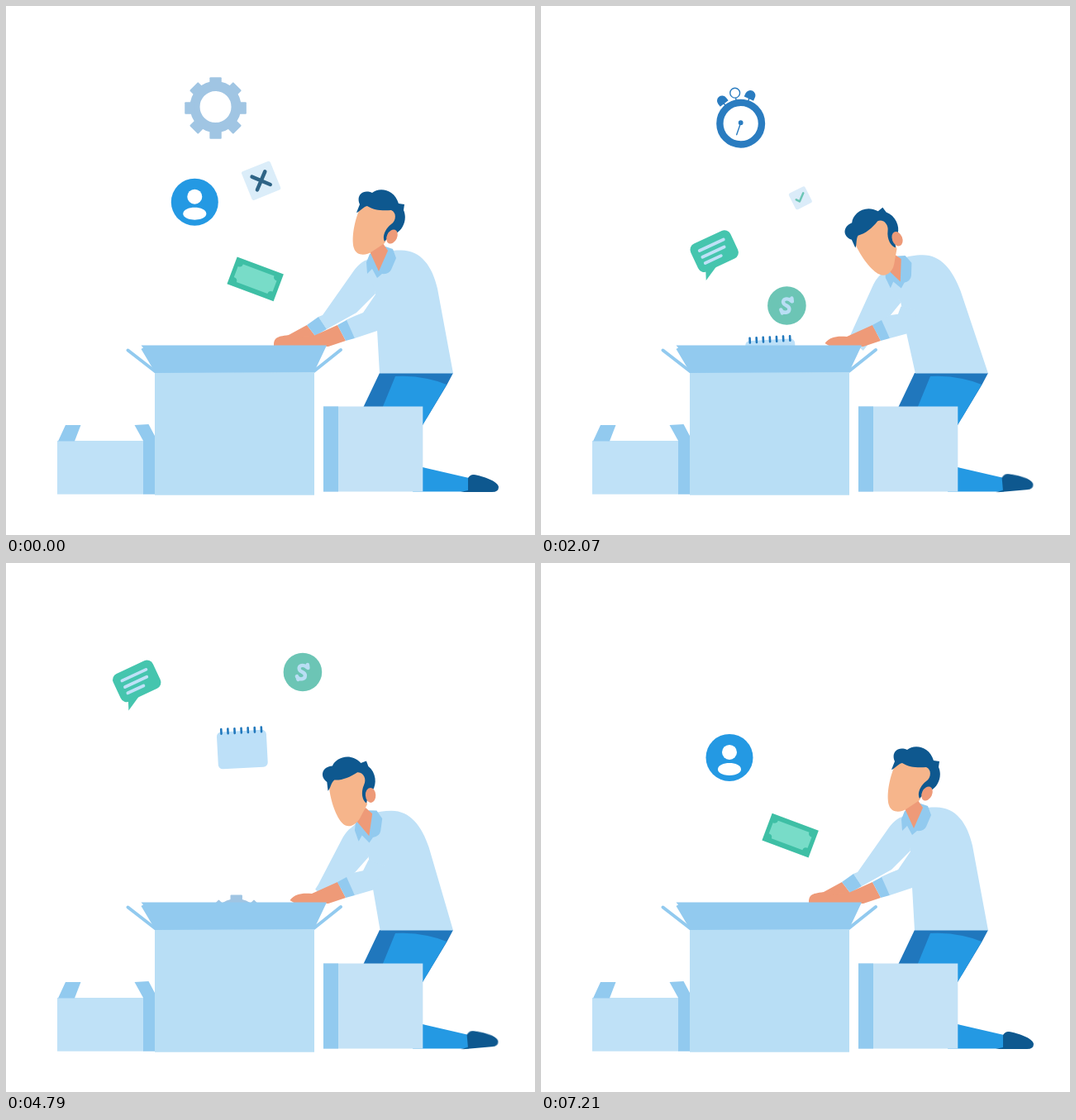
Recreate the animation shown at these times as an HTML page. Size 640 px wide and 640 px high, loop 7280 ms.

```html
<!DOCTYPE html>
<html lang="en">
<head>
<meta charset="utf-8">
<title>Packing a box</title>
<style>
  html, body { margin: 0; width: 100%; height: 100%; overflow: hidden; background: #fff; }
  svg { display: block; width: 100vw; height: 100vh; }
  .line { fill: none; stroke-linecap: round; stroke-linejoin: round; }
  .shirt { fill: #bfe1f7; }
  .trim { fill: #92caef; }
  .skin { fill: #ee9a78; }
  .navy { fill: #0e588f; }
  .blue { fill: #2499e3; }
  .bell { fill: #2a7cc0; }
  #shoe { transform-origin: 556px 587px; animation: tap 7280ms linear infinite; }
  @keyframes tap {
    0%, 24%, 39%, 59%, 72%, 100% { transform: none; }
    28%, 33%, 63%, 67% { transform: rotate(-5deg); }
  }
</style>
</head>
<body>
<svg viewBox="0 0 640 640">
  <!-- things that drop into the box -->
  <g id="gear" fill="#a0c5e3">
    <circle cy="-1.5" r="25" fill="none" stroke="#a0c5e3" stroke-width="12"/>
  </g>
  <g id="user">
    <circle class="blue" r="28.5"/>
    <circle cy="-6.5" r="9" fill="#fff"/>
    <path d="M-14,14C-14,4 14,4 14,14C14,24 -14,24 -14,14Z" fill="#fff"/>
  </g>
  <g id="bill">
    <g transform="rotate(20.5)">
      <path d="M-30,-17.5H30V17.5H-30Z" fill="#3ebfa5"/>
      <path d="M-20,-11.5H20Q20,-7 25,-7V7Q20,7 20,11.5H-20Q-20,7 -25,7V-7Q-20,-7 -20,-11.5Z" fill="#78dcc8"/>
    </g>
  </g>
  <g id="cross">
    <g transform="rotate(-22)">
      <rect x="-18.7" y="-18.7" width="37.4" height="37.4" rx="2.5" fill="#dbedf9"/>
      <path class="line" d="M-8.5,-8.5L8.5,8.5M8.5,-8.5L-8.5,8.5" stroke="#2f6486" stroke-width="4.5"/>
    </g>
  </g>
  <g id="clock" stroke="#2a7cc0" stroke-width="1.4">
    <path class="line" d="M-6,-31L-5.5,-27M-21,-25L-17,-20M10.500,-32L9,-27"/>
    <circle cx="-7" cy="-37" r="5.900" fill="#fff"/>
    <path class="bell" d="M-5.500,3.500V0A5.500,5.500 0 0 1 5.500,0V3.500Z" transform="translate(-22.500 -27.500) rotate(-38)"/>
    <path class="bell" d="M-5.500,3.500V0A5.500,5.500 0 0 1 5.500,0V3.500Z" transform="translate(11.500 -34) rotate(25)"/>
    <circle r="25.300" fill="#fff" stroke-width="8.400"/>
    <path class="line" d="M0,-1L-5,13.500"/>
    <circle class="bell" cy="-1" r="2.200"/>
  </g>
  <g id="check">
    <g transform="rotate(-27)">
      <rect x="-11" y="-11" width="22" height="22" rx="2.500" fill="#dbecf9"/>
      <path class="line" d="M-5.400,-.5L-2.700,3.200L5.800,-3.800" stroke="#6cc5b5" stroke-width="2.500"/>
    </g>
  </g>
  <g id="chat">
    <g transform="rotate(-25)">
      <rect x="-26.500" y="-18.500" width="53" height="37" rx="8" fill="#45c5ae"/>
      <path d="M-19,16L-24,28L-4,17Z" fill="#45c5ae"/>
      <path class="line" d="M-16,-8H16M-16,.5H13M-16,8.500H5" stroke="#bfe1f7" stroke-width="3.800"/>
    </g>
  </g>
  <g id="coin">
    <circle r="23.300" fill="#6cc5b5"/>
    <path class="line" d="M5.500,-5.500C1,-10 -6,-8 -4,-3C-3,0 3,0 3,4C3,9 -4,10 -7,5.500M6,-9L6.500,-5M-7,5L-5.500,9" stroke="#b9def4" stroke-width="4.400"/>
  </g>
  <g id="pad">
    <g transform="rotate(-3)">
      <rect x="-30" y="-21.500" width="60" height="45" rx="5.500" fill="#bde0f8"/>
      <path class="line" id="rings" stroke="#2279bd" stroke-width="2.600"/>
    </g>
  </g>

  <!-- legs -->
  <path d="M452,444H541L533,459L504,507L432,486Z" fill="#2077bd"/>
  <path class="blue" d="M471,448Q502,446 533,458L504,507L500,520L455,487Z"/>
  <path class="blue" d="M504,558L560,571V587.500H492Z"/>
  <path class="navy" id="shoe" d="M559,571Q562,566.500 566,567C576,568.500 596,575 596,582Q596,588 588,588H550L559,586Z"/>

  <!-- upper body: data-bent holds the outline when leaning in -->
  <path class="shirt" d="M441,306C430,308 425,315 421,320L383,374L378,376L388,391L424,371L447,348Z"
    data-bent="M412,324C406,328 403,333 400,339L375,397L372,405L390,420L423,374L434,360Z"/>
  <g id="farHand">
    <path class="skin" d="M364,386L342,398C326,400 324,402 324,412H360L374,399Z"/>
    <path class="trim" d="M364,386L378,376L388,391L374,399Z"/>
  </g>
  <path class="shirt" d="M436,308C448,297 464,295.5 478,295.5C502,295.5 516,315 522,342L541,444.5L452,444.5L449,392L447,348Z"
    data-bent="M409,326C425,308 440,302 460,302C482,302 496,320 506,345L541,444.5L453,444.5L441.5,397L434,360Z"/>
  <path class="skin" d="M401,386L370,400C358,399 350,400 343.500,408L350,412H390L411,405Z"/>
  <path class="shirt" d="M411,380L422,375L432,371L447,349L462,360L449,393L422,402Z"
    data-bent="M411,380L423,374L432,373L434,365L455,370L441.5,397L422,402Z"/>
  <path class="trim" d="M401,386L412,380L422,402L411,405Z"/>
  <g id="neck">
    <path class="trim" d="M440,300L436,310L437,324L443,318L449,329L455,324Q463,325 466,319L472,305L468,294L459,291Z"/>
    <path class="skin" d="M440,297L456,287L462,296L451,321Z"/>
  </g>
  <g id="head">
    <path d="M428,245C420,264 418,284 421,293C424,303 436,302 443,297L458,287L462,278L472,262L470,246L440,240Z" fill="#f6b58b"/>
    <path class="navy" d="M424,250L428,240C423,229 432,221 443,226C451,219 470,221 475,239L482,240L481,247C486,258 480,271 472,275C465,276 460,283 458,285C455,280 458,270 466,264C472,260 473,250 466,247C455,248 445,247 437,242C432,243 428,249 424,250Z"/>
    <ellipse class="skin" rx="6.200" ry="9" transform="translate(467 279) rotate(25)"/>
  </g>

  <!-- boxes -->
  <rect class="shirt" x="62" y="526" width="104.500" height="64.700"/>
  <path class="trim" d="M72,507H90.500L83,526.500H63ZM155.500,507L172.500,506L180.500,521V590.700H166V526Z"/>
  <path class="line" d="M147.500,416.500L181,442.500M405,416L373,441.500" stroke="#92caef" stroke-width="4"/>
  <path class="trim" d="M163.500,410.500H388L375,438L373,444H180L179,441L163.500,415L166,413.500Z"/>
  <path d="M180,444L373,443V591.700H180Z" fill="#b8def5"/>
  <rect x="384" y="484.500" width="120.300" height="103" fill="#c4e2f6"/>
  <rect class="trim" x="384" y="484.500" width="18" height="103"/>
</svg>
<script>
const LOOP = 7280, FLOOR = 480;
const $ = id => document.getElementById(id);
const move = (el, value) => el.setAttribute('transform', value);
const clamp = u => Math.min(1, Math.max(0, u));
const mix = (a, b, u) => a + (b - a) * u;

for (let a = 0; a < 360; a += 45)
  $('gear').insertAdjacentHTML('beforeend',
    `<rect x="-7.2" y="-37.3" width="14.4" height="11" rx="1" transform="rotate(${a})"/>`);
let rings = '';
for (let i = -3; i <= 3; i++) rings += `M${i * 8.1},-24.8v5.6`;
$('rings').setAttribute('d', rings);

// An item falls from (x, y) to the box floor at x = to, once per start time.
const drop = (id, x, y, to, ms, ...starts) => ({ el: $(id), x, y, to, ms, starts });
const drops = [
  drop('gear', 253.5, 123, 282, 1500, -5, 3437),
  drop('user', 203, 95, 271.5, 1358, -591, 2768, 6625),
  drop('bill', 294, 150, 308, 1400, -845, 2484, 6368),
  drop('cross', 324.5, 95, 272, 1353, -498, 2871),
  drop('clock', 236.5, 92, 276.5, 1583, 1783, 5442),
  drop('check', 346, 74, 263.5, 1758, 1269, 5248),
  drop('chat', 158, 142, 271, 1576, 1250, 4780),
  drop('coin', 372, 83, 266, 1482, 965, 4532),
  drop('pad', 292, 63, 276, 1798, 472, 3975)
];

function fall({ el, x, y, to, ms, starts }, t) {
  const start = starts.find(s => t >= s && t < s + ms);
  el.style.display = start === undefined ? 'none' : '';
  if (start === undefined) return;
  const u = ((t - start) / ms) ** 1.2;
  move(el, `translate(${mix(x, to, u)} ${mix(y, FLOOR, u)})`);
}

// 0 upright, 1 bent over the box; he bends twice per loop.
function ramp(t, from, to) {
  const u = clamp((t - from) / (to - from));
  return u * u * (3 - 2 * u);
}
const lean = t => ramp(t, 0, 1150) - ramp(t, 1800, 3180) + ramp(t, 3130, 5900) - ramp(t, 6150, 7180);

const NUM = /[\d.]+/g;
const bends = [...document.querySelectorAll('[data-bent]')].map(el => ({
  el, up: el.getAttribute('d'), bent: el.dataset.bent.match(NUM)
}));

function pose(p) {
  for (const { el, up, bent } of bends) {
    let i = 0;
    el.setAttribute('d', up.replace(NUM, n => mix(+n, +bent[i++], p).toFixed(2)));
  }
  move($('farHand'), `translate(${-8 * p} ${36 * p})`);
  move($('neck'), `translate(${-25 * p} ${13 * p}) rotate(${-24 * p} 456 305)`);
  move($('head'), `translate(${-40 * p} ${3 * p}) rotate(${-54 * p ** 1.5} 467 279)`);
}

const begin = performance.now();
function tick() {
  const t = (performance.now() - begin) % LOOP;
  for (const d of drops) fall(d, t);
  pose(clamp(lean(t)));
  requestAnimationFrame(tick);
}
tick();
</script>
</body>
</html>
```
